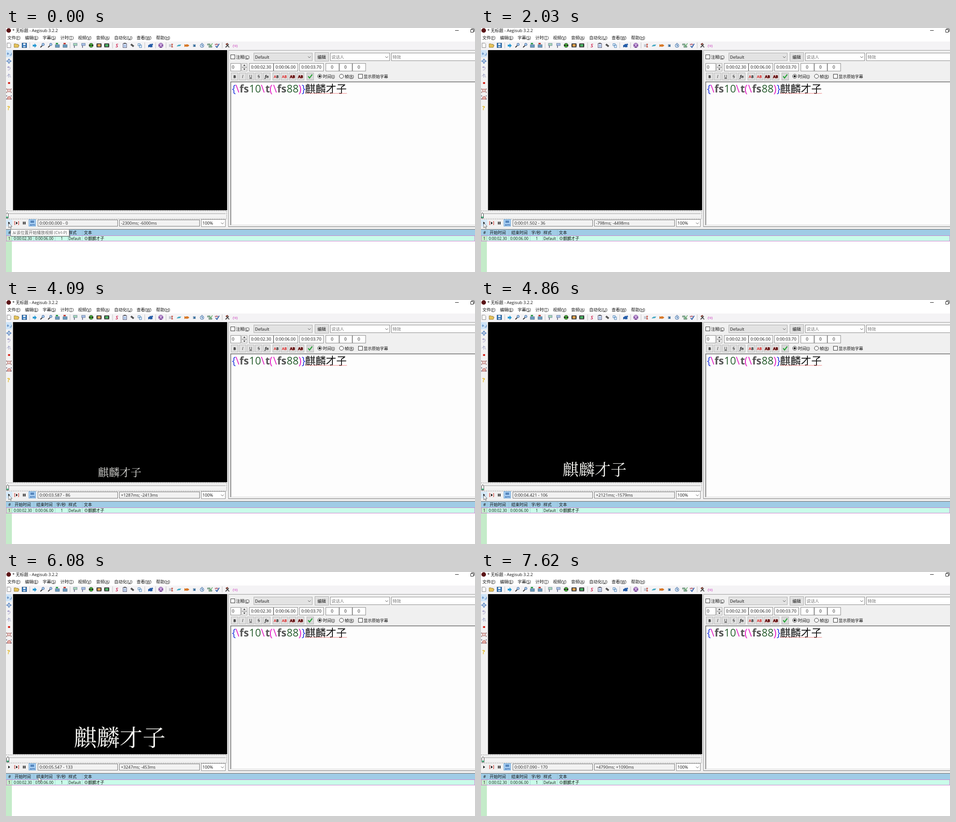
Animation, 1036 px wide and 541 px high, one loop 7.66 s. Source, as an HTML page:

```html
<!DOCTYPE html>
<html lang="zh">
<head>
<meta charset="utf-8">
<style>
  html, body { margin: 0; width: 100%; height: 100%; overflow: hidden; background: #f0f0f0; }
  svg { display: block; width: 1036px; height: 541px; }
  text { font: 9.25px 'Open Sans', 'Noto Sans CJK SC', 'Noto Sans CJK', sans-serif; white-space: pre; }
  #subtitle { font-family: 'Noto Serif CJK SC', 'Noto Sans CJK SC', 'Noto Sans CJK', serif; font-weight: 300; }
</style>
</head>
<body>
<svg id="stage" viewBox="0 0 1036 541" xmlns="http://www.w3.org/2000/svg"></svg>
<script>
const LOOP = 7660;
const parts = [];
const add = markup => parts.push(markup);
const rect = (x, y, w, h, fill, extra = '') =>
  add(`<rect x="${x}" y="${y}" width="${w}" height="${h}" fill="${fill}" ${extra}/>`);
const box = (x, y, w, h, fill = '#fff', line = '#8a8a8a') =>
  rect(x + .5, y + .5, w - 1, h - 1, fill, `stroke="${line}"`);
const label = (x, y, str, fill = '#111', size = 9.25, css = '') =>
  add(`<text x="${x}" y="${y}" fill="${fill}" style="font-size:${size}px;${css}">${str}</text>`);
const path = (d, fill = 'none', line = 'none', width = 1, extra = '') =>
  add(`<path d="${d}" fill="${fill}" stroke="${line}" stroke-width="${width}" ${extra}/>`);
const dot = (x, y, r, fill, line = 'none') =>
  add(`<circle cx="${x}" cy="${y}" r="${r}" fill="${fill}" stroke="${line}"/>`);
const key = (str, letter) => `${str}(<tspan text-decoration="underline">${letter}</tspan>)`;
const chevron = (x, y) => path(`M${x - 3} ${y - 1.5}l3 3 3-3`, 'none', '#555');

function drawTitleAndMenu() {
  rect(0, 0, 1036, 30, '#fff');
  dot(6, 5.5, 5, '#5a1416');
  label(14, 9, '* 无标题 - Aegisub 3.2.2');
  path('M992 5.5h8', 'none', '#222');
  path('M1026.5 3.5h6v6h-6zM1028.5 3v-1.5h6v6h-2', 'none', '#222');
  const menus = [[3, '文件', 'F'], [42, '编辑', 'E'], [81, '字幕', 'S'], [120, '计时', 'T'], [159, '视频', 'V'],
    [199, '音频', 'A'], [239, '自动化', 'U'], [288.5, '查看', 'W'], [331.5, '帮助', 'H']];
  for (const [x, name, letter] of menus) label(x, 24.5, key(name, letter));
}

function magnifier(x) {
  path(`M${x - 4} 43l4-4`, 'none', '#333', 2);
  dot(x + 2, 36.5, 2.7, '#a9cdf0', '#345c91');
}
function film(x, fill) {
  rect(x - 5, 34, 11, 9, '#222');
  rect(x - 3, 36, 7, 5, fill);
  path(`M${x - 5} 35h11M${x - 5} 42h11`, 'none', '#ddd', 1, 'stroke-dasharray="1 1"');
}
function flag(x, fill) {
  rect(x - 4, 34, 8, 5, fill, 'stroke="#55758f" stroke-width=".8"');
  path(`M${x - 2} 39v5`, 'none', '#557', 1.5);
}

function drawToolbar() {
  rect(0, 30, 1036, 19, '#f4f3f5');
  for (const x of [52, 141, 235, 306, 330, 353, 477]) path(`M${x + .5} 32v13`, 'none', '#c4c4c4');
  path('M2.5 33.5h6l2 2v8h-8z', '#fff', '#888');
  path('M18 43v-8h4l1 1h4v2h2l-2 5z', '#e6c35a', '#826a28', .8);
  box(35, 33, 11, 11, '#3478bd', '#24527f');
  rect(38, 34, 5, 4, '#e6f0fa');
  rect(38, 40, 5, 3, '#b9cfe4');
  path('M59 37h4v-3l5 5-5 5v-3h-4z', '#2b9bd4');
  magnifier(80);
  magnifier(97);
  for (const [x, mark] of [[113, '#2e9e4d'], [130, '#c03c36']]) {
    path(`M${x - 3} 33h5v3h-5z`, mark);
    rect(x - 4, 37, 9, 6, '#6b9cc0', 'stroke="#41637e" stroke-width=".8"');
  }
  flag(153, '#a9d8b8');
  flag(171, '#a9bde8');
  dot(188, 38.5, 5, '#272b20');
  path('M184 36h8M184 41h8M188 34v9', 'none', '#49b43e', 1.8);
  film(205, '#e4a04b');
  film(222, '#48b061');
  label(242, 43, 'S', '#d43b62', 11, 'font-weight:bold;font-style:italic');
  box(258, 34, 9, 10, '#e6eefa', '#557');
  rect(260, 33, 5, 2, '#444');
  path('M260 38h5M260 41h5', 'none', '#4479c4');
  path('M276 36l6 5', 'none', '#555', 4);
  path('M291.5 34.5h5v5h-5zM294.5 37.5h5v6h-5z', '#dce9f7', '#5a8dbd');
  path('M314 38l3-1 1-2 3 1 2-2 2 3-2 2 1 3-4 1-3-1-3 1z', '#245ca8');
  dot(342, 38.5, 5, '#c8a5dc', '#753d96');
  path('M339 37v3M345 37v3M340 42h4', 'none', '#5b267b', 1.5);
  rect(360, 36, 6, 6, '#c4c9d2');
  path('M367 35v8M369 36h-4M369 42h-4', 'none', '#c65343', 1.5);
  path('M377 41q3-5 8-4l2-1-2 4z', '#43a9c4');
  path('M394 36l3 1q4-3 8 2-4 4-8 2l-3 1z', '#d87826');
  rect(413, 36, 6, 6, '#87a4bd');
  rect(415, 38, 3, 3, '#205f99');
  dot(433, 39, 4, '#eef6ff', '#285c99');
  path('M433 34v-1M433 36.5v3h2', 'none', '#285c99', 1.3);
  path('M445 35h6v3h-6zM448 40h7v3h-7z', '#91b8a1', '#52735e', .7);
  path('M450 38l2 2 4-6', 'none', '#3a9b44', 1.3);
  label(461, 38, 'ab', '#a34054', 6, 'font-weight:bold');
  path('M463 40l3 3 5-8', 'none', '#315fa9', 2);
  path('M485 43l7-7M486 35l7 8', 'none', '#444', 1.8);
  path('M485 36l4-3 2 2-4 3z', '#823c30');
  label(501, 41.5, '(\\t)', '#c423b4', 8);
}

function drawVideoTools() {
  rect(0, 49, 15, 356, '#f2f2f2');
  rect(0, 49, 13, 16, '#cfe5f8');
  path('M2 57h5M4 54v6M8 60h4v-5', 'none', '#386fb0');
  path('M6.5 68l2 2.5h-4zM6.5 79l2-2.5h-4zM1 73.5l2.5-2v4zM12 73.5l-2.5-2v4zM6.5 70v7M3 73.5h7', '#5b87c4', '#5b87c4');
  path('M4 87q6-2 5 3-1 4-5 3M3 87l3-2v4z', 'none', '#9a92c4');
  path('M2 107q4-6 8-2M6 101v9M8 107l3 2', 'none', '#8f92bd');
  rect(4.5, 120, 4.5, 4, '#d5271d');
  path('M3.5 135.5h6v6h-6z', '#e6cfcc', '#b8645e');
  path('M1.5 134v10M11.5 134v10', 'none', '#8d6a6a', 1.5, 'stroke-dasharray="3 4"');
  path('M3 158v-4l4-3 4 3v4z', '#e0aaa4', '#b8645e');
  path('M1.500 149v11M11.5 149v11', 'none', '#6c6c80', 1.5, 'stroke-dasharray="3 4"');
  label(2.5, 181.5, '?', '#e1b51b', 13, 'font-weight:bold');
  rect(15.5, 49, 473, 355, '#000');
}

function drawPlayerBar() {
  rect(0, 404, 490, 43, '#f0f0f0');
  path('M0 405.5h487.5V423.5H0', 'none', '#8b8b8b', 1, 'stroke-dasharray="2 2"');
  path('M2 411.5h483', 'none', '#a5a5a5');
  path('M2 416.5h483', 'none', '#fff');
  add('<g id="thumb"><path d="M0 421.5v-9l2.5-3 2.5 3v9z" fill="#fff" stroke="#333"/><path d="M.5 418h4v3h-4z" fill="#4bc58c"/></g>');
  rect(0, 425, 14, 15, '#d6e9f8', 'id="hover"');
  path('M5 429.5l4 3-4 3z', '#111');
  path('M20.5 429h-1.5v7h1.5M26.5 429h1.5v7h-1.5', 'none', '#d33a32', 1.2);
  path('M22 429.5l4 3-4 3z', '#111');
  path('M38.5 429.5v6M42 429.5v6', 'none', '#111', 2);
  box(50, 424, 16, 16, '#a6cdf2', '#78add9');
  rect(54, 427, 8, 5, '#5687bd');
  label(53, 438, 'AUTO', '#174b91', 4, 'font-weight:bold');
  box(70, 425, 177, 15, '#f2f2f2', '#777');
  box(250, 425, 178, 15, '#f2f2f2', '#777');
  add('<text id="clock" x="74" y="436" fill="#222"></text><text id="offset" x="254" y="436" fill="#222"></text>');
  box(431, 424, 54, 17);
  label(434, 436, '100%');
  chevron(478, 433);
}

function drawEditor() {
  rect(490, 49, 546, 393, '#f0f0f0');
  path('M491.5 442V49.5H1036', 'none', '#9b9b9b');

  box(496, 59, 10, 10, '#fff', '#333');
  label(508, 67.5, key('注释', 'C'));
  box(547, 55, 130, 18, '#e3e3e3', '#adadad');
  label(550, 67.5, 'Default');
  chevron(670, 64.5);
  box(682, 54, 31, 20, '#e1e1e1', '#adadad');
  label(688, 67.5, '编辑');
  box(716, 55, 132, 18);
  label(719, 67.5, '说话人', '#777');
  chevron(841, 64.5);
  box(851, 55, 190, 18);
  label(854, 67.5, '特效', '#777');

  box(496, 78, 23, 18);
  label(499, 90, '0');
  box(520, 78, 13, 9, '#eee', '#aaa');
  box(520, 87, 13, 9, '#eee', '#aaa');
  path('M524 84l2.5-3 2.5 3zM524 90l2.5 3 2.5-3z', '#333');
  for (const [x, w, str] of [[537, 54, '0:00:02.30'], [591, 54, '0:00:06.00'], [648, 54, '0:00:03.70'],
    [706, 30, '0'], [736, 29, '0'], [765, 30, '0']]) {
    box(x, 78, w, 18);
    label(x + w / 2 - .5, 90, str, '#111', 9.25, 'text-anchor:middle');
  }

  const styles = [['B', 'font-weight:bold'], ['I', 'font-style:italic'], ['U', 'text-decoration:underline'],
    ['S', 'text-decoration:line-through'], ['fn', 'font-style:italic;font-weight:bold']];
  styles.forEach(([str, css], i) => {
    box(497 + i * 17.75, 99, 16, 17, '#e1e1e1', '#b5b5b5');
    label(505 + i * 17.75, 110.5, str, '#111', 8.5, 'text-anchor:middle;' + css);
  });
  const swatches = [['#d22', '#222'], ['#d22', '#d22'], ['#300', '#300'], ['#300', '#300']];
  swatches.forEach(([first, second], i) => {
    const x = 589 + i * 17.9;
    box(x, 99, 16, 17, '#e1e1e1', '#b5b5b5');
    const outline = i > 1 ? 'paint-order:stroke;stroke:#c44;stroke-width:1px;' : '';
    label(x + 8, 110.5, `<tspan fill="${first}">A</tspan><tspan fill="${second}">B</tspan>`, '#111', 8,
      outline + 'font-weight:bold;text-anchor:middle');
  });
  box(664, 99, 16, 17, '#d9d9d9', '#b5b5b5');
  path('M667.5 107l3 4 6-8', 'none', '#26a337', 2.2);
  dot(693, 107, 4.5, '#fff', '#333');
  dot(693, 107, 2.5, '#222');
  label(700, 110.5, key('时间', 'I'));
  dot(741, 107, 4.5, '#fff', '#333');
  label(748, 110.5, key('帧', 'R'));
  box(778, 102, 10, 10, '#fff', '#333');
  label(790, 110.5, '显示原始字幕', '#111', 9);

  rect(496, 119, 540, 318, '#fdfdfd');
  path('M496.5 437V119.5H1036', 'none', '#666', 1.5);
  path('M497 436.5H1036', 'none', '#e2e2e2');
  const blue = '#2b3ee0', pink = '#e31cc3', grey = '#555', green = '#2b6032';
  const tokens = [[499, '{', blue], [507, '\\', pink], [516, 'fs', grey], [537, '10', green], [563, '\\', pink],
    [573, 't', grey], [582, '(', pink], [590, '\\', pink], [599, 'fs', grey], [620, '88', green],
    [646, ')', pink], [653, '}', blue], [660.5, '麒麟才子', '#111']];
  for (const [x, str, fill] of tokens) label(x, 143, str, fill, 23, fill === grey ? 'font-weight:bold' : '');
  path('M661 146' + 'l2-2 2 2'.repeat(23), 'none', '#e85b5b', .8);
}

function drawGrid() {
  rect(0, 441, 1036, 6, '#f0f0f0');
  path('M491 440.5H1036', 'none', '#777');
  path('M0 446.5H1036', 'none', '#666');
  rect(0, 447, 1036, 13, '#a0cce6');
  rect(0, 472, 1036, 69, '#fff');
  rect(0, 460, 1036, 12, '#c9fce9');
  rect(0, 460, 13, 81, '#c4ebc9');
  for (const x of [13, 61, 108, 136, 168]) path(`M${x + .5} 447v25`, 'none', '#8eb8c8', .6);
  rect(.5, 460.5, 1035, 12, 'none', 'stroke="#cf7fce"');
  for (const [x, str] of [[5, '#'], [19, '开始时间'], [67, '结束时间'], [111, '字/秒'], [138, '样式'], [172, '文本']])
    label(x, 457, str, '#111', 9);
  for (const [x, str, size] of [[5, '1', 8.4], [17, '0:00:02.30', 8.4], [64.5, '0:00:06.00', 8.4],
    [121, '1', 8.4], [138, 'Default', 8.1], [181.5, '麒麟才子', 8.8]]) label(x, 469.5, str, '#111', size);
  dot(177, 466.5, 3, 'none', '#333');
  dot(177, 466.5, 1, '#777');
}

function drawOverlays() {
  add('<text id="subtitle" x="251" text-anchor="middle" fill="#f6f6f2">麒麟才子</text>');
  add('<g id="tooltip">');
  rect(12, 449, 130, 14, '#000', 'opacity=".25"');
  box(10, 446, 130, 16, '#fff', '#767676');
  label(14, 457, '从该位置开始播放视频 (Ctrl-P)', '#575757', 9);
  add('</g>');
  path('M.5.5v10.5l2.5-2.3 1.7 3.8 1.7-.8-1.7-3.6h3.3z', '#fff', '#444', .8, 'id="cursor"');
}

// Linear interpolation between rows of [time, value, value, ...].
function along(knots, t) {
  if (t <= knots[0][0]) return knots[0].slice(1);
  for (let i = 1; i < knots.length; i++) {
    const [a, b] = [knots[i - 1], knots[i]];
    if (t <= b[0]) {
      const k = (t - a[0]) / (b[0] - a[0]);
      return a.slice(1).map((v, j) => v + (b[j + 1] - v) * k);
    }
  }
  return knots[knots.length - 1].slice(1);
}

const playback = [[490, 0], [2030, 36], [3240, 64], [4860, 106], [5550, 122], [6490, 143], [6570, 144], [7620, 170]];
const pointer = [[5900, 5.5, 432], [6300, 150, 480], [6490, 227.5, 469.5], [7000, 714, 545]];
const signed = ms => (ms < 0 ? '' : '+') + ms + 'ms';

[drawTitleAndMenu, drawToolbar, drawVideoTools, drawPlayerBar, drawEditor, drawGrid, drawOverlays].forEach(draw => draw());
document.getElementById('stage').innerHTML = parts.join('');
const [thumb, hover, clock, offset, subtitle, tooltip, cursor] =
  ['thumb', 'hover', 'clock', 'offset', 'subtitle', 'tooltip', 'cursor'].map(id => document.getElementById(id));
const show = (el, visible) => el.setAttribute('visibility', visible ? 'visible' : 'hidden');

function render() {
  const t = performance.now() % LOOP;
  const frame = Math.floor(along(playback, t)[0] + .01);
  const ms = Math.round(frame * 1001 / 24);
  clock.textContent = `0:00:0${(ms / 1000).toFixed(3)} - ${frame}`;
  offset.textContent = `${signed(ms - 2300)}; ${signed(ms - 6000)}`;
  thumb.setAttribute('transform', `translate(${frame * .011} 0)`);

  const size = 10 + 78 * (ms - 2300) / 3700;
  const visible = ms >= 2300 && ms < 6000;
  show(subtitle, visible);
  if (visible) {
    subtitle.style.fontSize = size * .646 + 'px';
    subtitle.setAttribute('y', 395.5 - size * .118);
    subtitle.setAttribute('opacity', Math.min(1, .65 + size / 150));
  }

  const [x, y] = along(pointer, t);
  cursor.setAttribute('transform', `translate(${x} ${y})`);
  show(hover, x < 14);
  show(tooltip, t < 410);
  requestAnimationFrame(render);
}
render();
</script>
</body>
</html>
```
